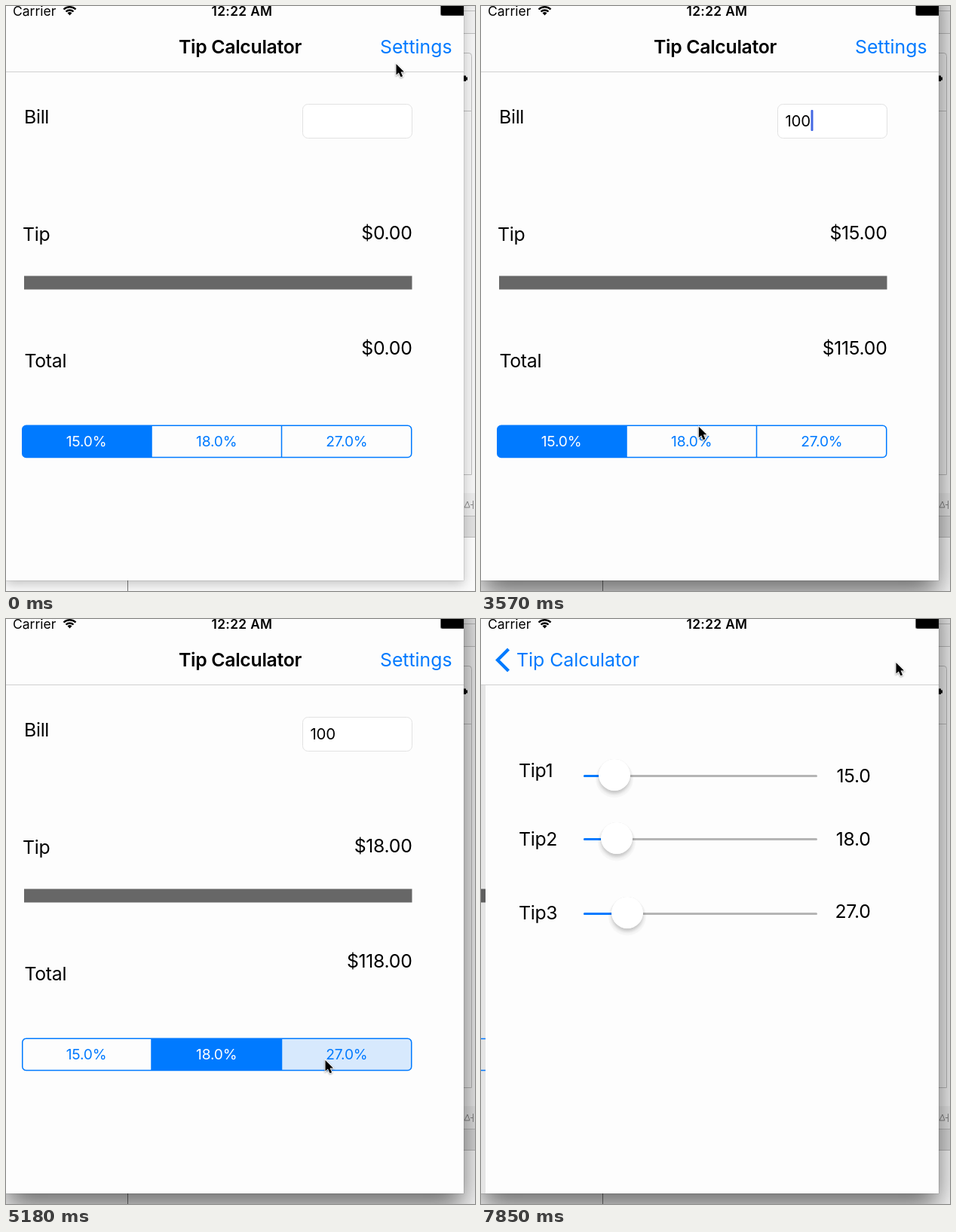
Write an HTML page that moves like this. It is 622 px wide and 777 px high and loops after 8 s.

```html
<!DOCTYPE html>
<html lang="en">
<head>
<meta charset="utf-8">
<title>Tip Calculator</title>
<style>
  html, body { margin: 0; width: 100%; height: 100%; overflow: hidden; background: #fff; }
  #stage { position: relative; width: 622px; height: 777px; overflow: hidden; }
  svg { position: absolute; left: 0; top: 0; font: 24.8px Inter, sans-serif; letter-spacing: -.3px; }
  #win { position: absolute; left: 0; top: -40px; width: 607px; height: 803px; background: #fdfdfd;
    box-shadow: 0 5px 14px rgba(0,0,0,.22), 0 0 1px rgba(0,0,0,.5); }
  #win.active { box-shadow: 0 18px 36px rgba(0,0,0,.58), 0 0 1px rgba(0,0,0,.6); }
  .blue { fill: #007aff; }
  .end { text-anchor: end; }
  .mid { text-anchor: middle; }
  .seg { font-size: 19.2px; letter-spacing: -.2px; }
  .line { fill: none; stroke: #007aff; stroke-width: 1.5; }
</style>
</head>
<body>
<div id="stage">
  <svg width="622" height="777">
    <rect width="622" height="777" fill="#f3f3f3"/>
    <path d="M600 0h22v36h-22z" fill="#eee"/>
    <path d="M600 647h22v30h-22z" fill="#e9e9e9"/>
    <path d="M600 677h22v28h-22z" fill="#dedede"/>
    <path d="M0 706H622V777H0z" fill="#fafafa"/>
    <g fill="none" stroke="#bcbcbc">
      <path d="M600 6.5h22M600 36.5h22M600 677.5h22M600 705.5h22M600 139.5h17"/>
      <path d="M600 62.5h14q3.500 0 3.500 4V622.500H600"/>
      <path d="M161.500 763v14" stroke="#777"/>
      <path d="M608 666l4-8 3 8zM619.500 657v11M616 662.500h3" stroke="#888"/>
    </g>
    <path d="M600 92.500h10v2h2v4h-2v1.500h-10z"/>
  </svg>
  <div id="win"></div>
  <svg width="622" height="777">
    <clipPath id="clip"><path d="M0 0H607V763H0z"/></clipPath>
    <g clip-path="url(#clip)">
      <text x="9" y="12.500" font-size="17.500" letter-spacing="0">Carrier</text>
      <text x="313" y="13" class="mid" font-size="17.300" font-weight="600" letter-spacing=".35">12:22 AM</text>
      <g fill="none" stroke="#000" stroke-width="2.400">
        <path d="M76.500 4.500a11.500 11.500 0 0 1 16 0M79.500 7.500a7.300 7.300 0 0 1 10 0"/>
      </g>
      <path d="M84.500 12.500l-3-3.200a4.500 4.500 0 0 1 6 0z"/>
      <path d="M576 0h31v13h-29q-2 0-2-2z" fill="#777"/>
      <path d="M577 0h30v12.500h-28q-2 0-2-2z"/>
      <path d="M0 87.500h607" stroke="#cfcfcf"/>

      <g id="main">
        <text x="310.500" y="63" class="mid" font-weight="600">Tip Calculator</text>
        <text id="settings" x="496" y="63" class="blue" letter-spacing="0">Settings</text>
        <text x="24" y="155.500">Bill</text>
        <text x="22" y="311.500">Tip</text>
        <text x="24.500" y="479.500">Total</text>
        <rect x="393.500" y="130.500" width="145" height="45" rx="7" fill="#fff" stroke="#e2e2e2"/>
        <text id="bill" x="403.500" y="160" font-size="20.500"></text>
        <rect id="caret" y="138" width="3" height="28" rx="1" fill="#4468e4"/>
        <text id="tip" x="538.500" y="310" class="end"></text>
        <text id="total" x="538.500" y="463" class="end"></text>
        <path d="M24 358.500H538.500V376.500H24z" fill="#676767"/>
        <g id="segs"></g>
      </g>

      <g id="prefs">
        <path d="M0 88h6v675H0z" fill="#e5e5e5"/>
        <path d="M0 358.500h6v18H0z" fill="#5e5e5e"/>
        <path d="M0 557.500h6M0 599.500h6" class="line"/>
        <path d="M36.500 40L22 54.500 36.500 69" class="line" style="stroke-width:4.200"/>
        <text x="47" y="63" class="blue" letter-spacing="0">Tip Calculator</text>
        <g id="sliders"></g>
      </g>
    </g>
    <path id="mouse" d="M0 0V14.500L3.400 11.500 6 17.300 8.600 16.200 6.100 10.500H10.500z"
      stroke="#fff" stroke-width="1.600" paint-order="stroke" style="filter:drop-shadow(0 1px 1px rgba(0,0,0,.4))"/>
  </svg>
</div>
<script>
const $ = id => document.getElementById(id);
const LOOP = 8000, RATES = [15, 18, 27];

// The screen refreshes only at these moments.
const ticks = [0, 150, 290, 440, 740, 890, 1330, 1480, 1780, 1930, 2230, 2380,
  2980, 3130, 3270, 3420, 3570, 3720, 3860, 4010, 4160, 4300, 4450, 4590,
  4890, 5040, 5180, 5330, 5480, 5780, 5930, 6070, 6220, 6370, 6520, 6660, 6810,
  6960, 7110, 7410, 7850];

// Pointer moves: start, end, target x, target y.
const moves = [[0, 440, 466, 152], [440, 740, 463, 154], [2830, 3720, 274, 592],
  [4010, 4590, 423, 586], [5480, 6660, 545, 72], [6660, 6810, 550, 58]];

const clamp = v => Math.max(0, Math.min(1, v));
const ease = v => v * v * (3 - 2 * v);
const mix = (a, b, k) => a + (b - a) * k;

const segLeft = [21.5, 193, 365.5, 538];
$('segs').innerHTML =
  `<clipPath id="pill"><rect x="21.500" y="557" width="516.500" height="42.500" rx="5.500"/></clipPath>` +
  RATES.map((r, i) => `<rect x="${segLeft[i]}" y="557" width="${segLeft[i + 1] - segLeft[i]}" height="43"
    fill="#007aff" clip-path="url(#pill)"/>`).join('') +
  `<rect x="21.750" y="557.250" width="516" height="42.250" rx="5" class="line"/>
   <path d="M193 557v42.500M365.500 557v42.500" class="line"/>` +
  RATES.map((r, i) => `<text class="seg mid" x="${106.5 + 172.7 * i}" y="585">${r.toFixed(1)}%</text>`).join('');
const fills = $('segs').querySelectorAll(':scope > rect:not(.line)');
const labels = $('segs').querySelectorAll('text');

const slider = (rate, i, y, textY, valueY, x) => `
  <text x="50" y="${textY}">Tip${i}</text>
  <path d="M137.500 ${y}H444.500" stroke="#b5b5b5" stroke-width="3" stroke-linecap="round"/>
  <path d="M137.500 ${y}H${x}" stroke="#007aff" stroke-width="3" stroke-linecap="round"/>
  <circle cx="${x}" cy="${y - 1.5}" r="21" fill="#fff"
    style="filter:drop-shadow(0 4px 2px rgba(0,0,0,.16)) drop-shadow(0 0 .6px rgba(0,0,0,.25))"/>
  <circle cx="${x}" cy="${y + 4}" r="25" fill="#000" opacity=".025"/>
  <circle cx="${x}" cy="${y - 1.5}" r="21" fill="#fff"/>
  <text x="516.500" y="${valueY}" class="end">${rate.toFixed(1)}</text>`;
$('sliders').innerHTML = slider(15, 1, 208.5, 210, 217, 177) +
  slider(18, 2, 292.5, 301, 301, 180) + slider(27, 3, 391.5, 399, 397, 194);

function pointer(t) {
  let x = 517, y = 77;
  for (const [a, b, toX, toY] of moves) {
    const k = ease(clamp((t - a) / (b - a)));
    x = mix(x, toX, k);
    y = mix(y, toY, k);
  }
  return `translate(${x + .5} ${y})`;
}

function caretAlpha(t) {
  if (t < 740) return 0;
  if (t >= 1930 && t < 2980) return 1;
  const p = ((t - (t < 1930 ? 1330 : 2980) + 1000) % 1000) / 1000;
  return p < .3 ? clamp((.08 - p) / .18) : p < .6 ? clamp((p - .3) / .15) : clamp((1.08 - p) / .18);
}

function segment(i, t) {
  const on = [[-1e4, 3860], [3860, 5180], [5180, LOOP]][i];
  const [a, b] = on;
  let fill = t >= a && t < b ? 1 : 0, ink = fill;
  if (i && t === a) { fill = .15; ink = 0; }
  if (i && t === a + 150) fill = ink = .75;
  if (i < 2 && t === b) fill = ink = 1;
  if (i < 2 && t === b + 150) fill = ink = .3;
  fills[i].setAttribute('fill-opacity', fill);
  labels[i].setAttribute('fill', `rgb(${255 * ink},${mix(122, 255, ink)},255)`);
}

function draw(now) {
  const at = now % LOOP;
  const t = ticks.filter(v => v <= at).pop();
  const prefs = t >= 7850;
  $('win').className = t >= 440 ? 'active' : '';
  $('main').style.display = prefs ? 'none' : '';
  $('prefs').style.display = prefs ? '' : 'none';
  $('mouse').setAttribute('transform', pointer(t));

  const typed = '100'.slice(0, [1930, 2230, 2380].filter(v => v <= t).length);
  const rate = RATES[t < 4010 ? 0 : t < 5330 ? 1 : 2];
  const tip = typed * rate / 100;
  $('bill').textContent = typed;
  $('tip').textContent = '$' + tip.toFixed(2);
  $('total').textContent = '$' + (+typed + tip).toFixed(2);
  $('caret').setAttribute('x', [403.5, 412.5, 425, 437.5][typed.length]);
  $('caret').setAttribute('opacity', caretAlpha(t));
  $('settings').setAttribute('opacity', t >= 7410 ? .25 : 1);
  RATES.forEach((r, i) => segment(i, t));
}

function loop(now) {
  draw(now);
  requestAnimationFrame(loop);
}
draw(0);
requestAnimationFrame(loop);
</script>
</body>
</html>
```
